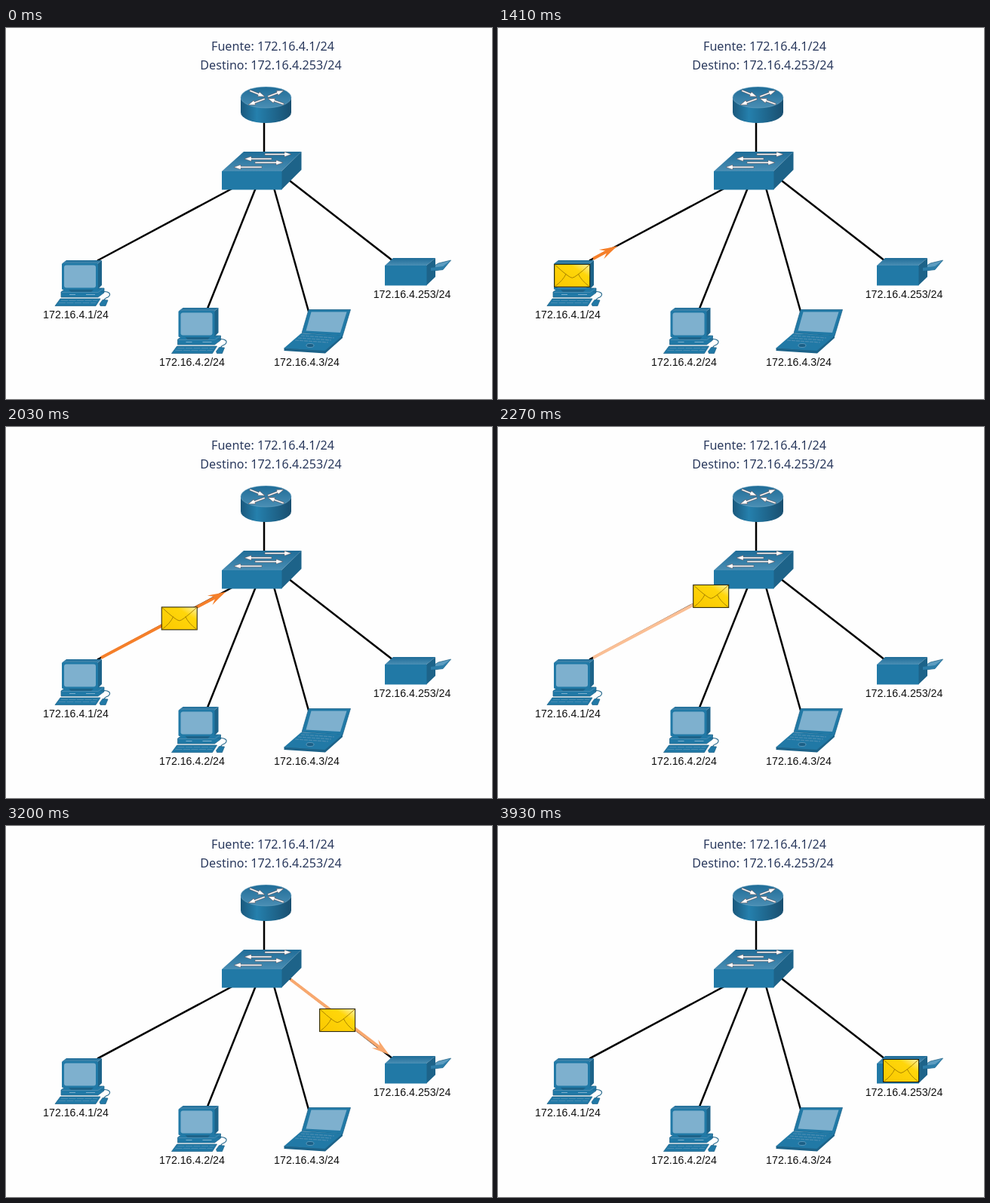
Write an HTML page that moves like this. It is 644x492 px and loops after 4.79 s.

```html
<!DOCTYPE html>
<html lang="es">
<head>
<meta charset="utf-8">
<style>
html, body { margin: 0; width: 100%; height: 100%; overflow: hidden; background: #fefefe; }
svg { display: block; width: 644px; height: 492px; }
text { text-anchor: middle; }
.title { font: 16.15px "Noto Sans", "Open Sans", sans-serif; fill: #2b3a5e; }
.label { font: 14.2px "Liberation Sans", Arial, sans-serif; fill: #111; }
.wire { stroke: #000; stroke-width: 2.5; }
.mark { fill: #fff; stroke: #5b4a50; stroke-width: .5; }
.face { fill: #2179a6; }
.side { fill: #1d6389; }
.edge { stroke: #1b5f86; stroke-width: .7; }
.glass { fill: #7eb0ce; }
</style>
</head>
<body>
<svg viewBox="0 0 644 492">
  <defs>
    <linearGradient id="top" x1="0" y1="0" x2="0" y2="1">
      <stop offset="0" stop-color="#1f6c97"/><stop offset="1" stop-color="#4a8eb4"/>
    </linearGradient>
    <linearGradient id="drum">
      <stop offset="0" stop-color="#1a587c"/><stop offset=".32" stop-color="#2580ad"/><stop offset="1" stop-color="#194f70"/>
    </linearGradient>
    <linearGradient id="gold" x1="0" y1="1" x2="1" y2="0">
      <stop offset="0" stop-color="#fac800"/><stop offset=".7" stop-color="#ffd60a"/><stop offset="1" stop-color="#fff3b0"/>
    </linearGradient>
    <g id="pc">
      <path class="face edge" d="M65 368.500L72 359H125L119 368.500Z"/>
      <path d="M73 361.500H121M70 364.500H119" stroke="#4a8cb2" stroke-width="1" stroke-dasharray="9 1.500"/>
      <path class="face edge" d="M73 350L80 345H130V351L122 357H73Z"/>
      <path d="M74 350.500H122L129 345.500" fill="none" stroke="#4a8cb2"/>
      <path d="M84 353.500H92M106 353.500H118" stroke="#7eb0ce"/>
      <path class="side" d="M82 346H117L113 350H86Z"/>
      <path class="side" d="M121 313L127 308V341L121 347Z"/>
      <path fill="url(#top)" d="M74 312.500L80 308H127L121 313Z"/>
      <rect class="face" x="74" y="312" width="48" height="35" rx="1.500"/>
      <rect class="glass" x="77" y="314.500" width="42" height="30" rx="3"/>
      <path d="M126 350C136 348 141 353 135 357Q131 358 130 361" fill="none" stroke="#24668a" stroke-width="1.100"/>
      <path class="face edge" d="M124 366L128 360.500L135 361L132 368.500H125Z"/>
    </g>
  </defs>

  <rect width="644" height="492" fill="#fefefe"/>
  <text class="title" x="353.500" y="30">Fuente: 172.16.4.1/24</text>
  <text class="title" x="351" y="55">Destino: 172.16.4.253/24</text>
  <path class="wire" d="M342 118V170M121 308.500L305 210M331 212L267 372M355 212L401 376M374 201L513 309"/>
  <g id="trails"></g>

  <!-- router -->
  <path fill="url(#drum)" d="M311 92V112A33.500 14 0 0 0 378 112V92Z"/>
  <ellipse cx="344.500" cy="92" rx="33.500" ry="14" fill="url(#top)" stroke="#77aac7" stroke-width=".5"/>

  <!-- switch -->
  <path fill="url(#top)" d="M286 190L315 164H391.500L365 190Z"/>
  <path class="side" d="M365 190L391.500 164V188L365 214.500Z"/>
  <path class="face" d="M286 190H365.500V214.500H286Z"/>
  <g id="marks"></g>

  <use href="#pc"/>
  <use href="#pc" x="154.500" y="63"/>

  <!-- laptop -->
  <path class="face edge" d="M401 373.500H456.500L446 408.500L392 404.500Z"/>
  <path class="glass" d="M404.500 376.500H451.500L443 404L397.500 401.500Z"/>
  <path class="side" d="M368.500 424L422 427L446 407V411L423 431.500L368.500 428Z"/>
  <path class="face" d="M391 405L446 408L422.500 428L368.500 424.500Z"/>
  <path d="M391 408L435 411M387 411L431 414M383 414L427 417" stroke="#4a8cb2" stroke-width="1.200" stroke-dasharray="5 1"/>
  <ellipse cx="403" cy="421" rx="5" ry="2.500" fill="#1b5f86" stroke="#7eb0ce" stroke-width=".6"/>

  <!-- printer -->
  <path d="M563 318L573 312L589.500 308L579 320.500L566 322Z" fill="#5c9cc0" stroke="#24668a" stroke-width=".8"/>
  <path fill="url(#top)" d="M502 315L513 305H569L557 315Z"/>
  <path class="side" d="M557 315L569 305V330L557 341.500Z"/>
  <path class="face" d="M502 315H557.500V341.500H502Z"/>
  <path d="M563 318L579 316L589 308.500L579 320.500L563 322Z" fill="#2c7da8"/>

  <text class="label" x="92.500" y="385">172.16.4.1/24</text>
  <text class="label" x="246.500" y="448">172.16.4.2/24</text>
  <text class="label" x="398.500" y="448">172.16.4.3/24</text>
  <text class="label" x="538" y="358">172.16.4.253/24</text>

  <g id="mail">
    <rect x=".5" y=".5" width="47" height="30" fill="url(#gold)" stroke="#1c1800"/>
    <path d="M1 1Q20 18.500 24 18.500T47 1M1 30Q12 22 16 13M47 30Q36 22 32 13" fill="none" stroke="#a98300"/>
  </g>
</svg>
<script>
const LOOP = 4790, FADE = 375;
const get = id => document.getElementById(id);
const clamp = v => Math.max(0, Math.min(1, v));
const degrees = (dx, dy) => Math.atan2(dy, dx) * 180 / Math.PI;

function add(parent, name, attrs) {
  const el = document.createElementNS('http://www.w3.org/2000/svg', name);
  for (const k in attrs) el.setAttribute(k, attrs[k]);
  return parent.appendChild(el);
}

// keys are [time, value, value...], joined linearly
function at(keys, t) {
  let i = 1;
  while (i < keys.length - 1 && t > keys[i][0]) i++;
  const a = keys[i - 1], b = keys[i], p = clamp((t - a[0]) / (b[0] - a[0]));
  return a.slice(1).map((v, n) => v + (b[n + 1] - v) * p);
}

// white direction arrows on router and switch: x1, y1, x2, y2
[[323, 83, 343, 91], [347, 91, 368, 83], [343, 94, 321, 102], [368, 101, 347, 93.5],
 [343, 167.5, 378, 167.5], [352, 173.5, 316, 173.5], [330, 178.5, 367, 178.5], [339, 184.5, 302, 184.5]]
.forEach(([x1, y1, x2, y2]) => {
  const len = Math.hypot(x2 - x1, y2 - y1);
  add(get('marks'), 'path', {
    class: 'mark',
    d: `M0 -1.100H${len - 9}V-3.200L${len} 0L${len - 9} 3.200V1.100H0Z`,
    transform: `translate(${x1} ${y1}) rotate(${degrees(x2 - x1, y2 - y1)})`
  });
});

const trails = [
  { from: [126, 306], slope: -.529, fade: 2082,
    tip: [[1265, 128], [1410, 158], [1480, 178], [1790, 245], [2060, 297]] },
  { from: [377, 203.5], slope: .763, fade: 3080,
    tip: [[2650, 379], [3080, 508]] }
];
for (const r of trails) {
  r.g = add(get('trails'), 'g', {
    transform: `translate(${r.from}) rotate(${degrees(1, r.slope)})`
  });
  r.line = add(r.g, 'path', { 'stroke-width': 4 });
  r.head = add(r.g, 'path', { d: 'M0 0Q-12 -3 -24 -7L-17 -1.500V1.500L-24 7Q-12 3 0 0Z' });
}

const mailPath = [[1410, 74, 313], [1480, 91, 303], [1790, 153, 268], [2270, 258, 209],
  [2560, 321, 173.5], [2680, 338, 187], [3200, 415, 242], [3720, 481, 288.5], [3930, 510, 309]];

function draw(now) {
  const t = now % LOOP;
  for (const r of trails) {
    const pale = clamp((t - r.fade) / FADE);
    const shown = t >= r.tip[0][0] && pale < 1;
    r.g.style.display = shown ? '' : 'none';
    if (!shown) continue;
    const len = (at(r.tip, t)[0] - r.from[0]) * Math.hypot(1, r.slope);
    const color = `rgb(${[245, 127, 42].map(c => Math.round(c + (254 - c) * pale))})`;
    r.line.setAttribute('d', `M0 0H${Math.max(0, len - 10)}`);
    r.line.setAttribute('stroke', color);
    r.head.setAttribute('fill', color);
    r.head.setAttribute('transform', `translate(${len} 0)`);
  }
  get('mail').setAttribute('transform', `translate(${at(mailPath, t)})`);
  get('mail').setAttribute('opacity', clamp((t - 940) / 310));
}

const start = performance.now();
function tick() {
  draw(performance.now() - start);
  requestAnimationFrame(tick);
}
tick();
</script>
</body>
</html>
```
